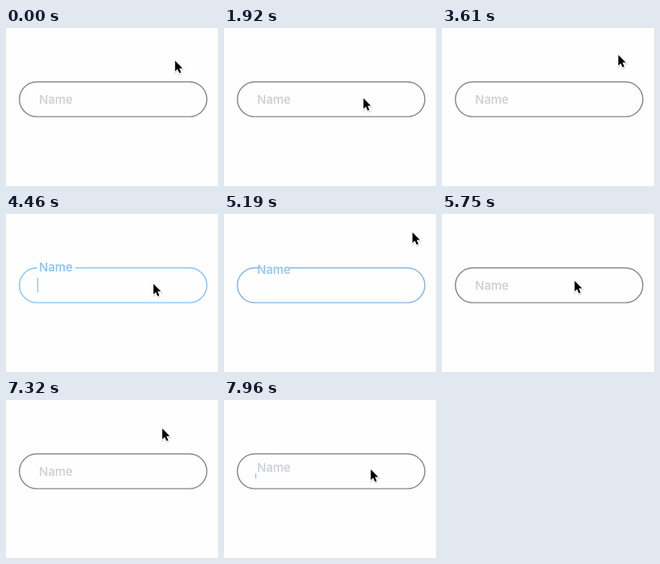
These frames come from a looping animation (266x198 px, 7.99 s). An HTML page:

```html
<!DOCTYPE html>
<html lang="en">
<head>
<meta charset="utf-8">
<title>Floating label field</title>
<style>
  html, body { margin: 0; width: 100%; height: 100%; overflow: hidden; background: #fefefe; }
  svg { display: block; width: 100vw; height: 100vh; }
  text { font: 500 15px Inter, "Open Sans", sans-serif; }
</style>
</head>
<body>
<svg viewBox="0 0 266 198">
  <defs>
    <path id="arrow" d="M0 0V13.4L3 10.5L5.3 15.6L7.4 14.7L5.2 9.6H9.3Z"/>
  </defs>
  <rect id="border" x="16.8" y="67.5" width="235.2" height="43.6" rx="21.8" fill="#fefefe" stroke-width="1.4"/>
  <rect id="gap" y="66" height="4" fill="#fefefe"/>
  <text id="label" x="41.6">Name</text>
  <rect id="caret" x="39.2" width="1.2" fill="#7cbcf4"/>
  <g id="pointer">
    <use href="#arrow" x=".8" y="2" stroke="#000" stroke-width="2.4" opacity=".14"/>
    <use href="#arrow" x=".5" y=".9" stroke="#fff" stroke-width="2" paint-order="stroke"/>
  </g>
</svg>
<script>
const LOOP = 7990;
const GREY = [134, 131, 133], PLACEHOLDER = [204, 204, 207], BLUE = [126, 194, 252];
const START = [211.7, 40];

// Each visit: the pointer arrives at the field, clicks, leaves, clicks outside and rests.
const visits = [
  { arrive: 800, focus: 2010, leave: 2410, blur: 2900, field: [174.5, 87], away: [207.5, 26], rest: [226, 25] },
  { arrive: 3500, focus: 4140, leave: 4460, blur: 5130, field: [184.5, 86.5], away: [236, 22], rest: [236, 22] },
  { arrive: 5300, focus: 6090, leave: 6230, blur: 6900, field: [164, 84.5], away: [197.7, 26], rest: [197.7, 26] },
  { arrive: 7200, focus: 7930, leave: LOOP, blur: LOOP, field: [183.7, 86], away: START, rest: START }
];

const mix = (a, b, u) => a + (b - a) * u;
const mixAll = (a, b, u) => a.map((v, i) => mix(v, b[i], u));
const rgb = color => `rgb(${color.map(Math.round)})`;

function ramp(time, begin, duration) {
  const u = Math.min(1, Math.max(0, (time - begin) / duration));
  return u * u * (3 - 2 * u);
}

function stateAt(time) {
  let point = START, focus = 0, caret = 0;
  for (const v of visits) {
    point = mixAll(point, v.field, ramp(time, v.arrive, 500));
    point = mixAll(point, v.away, ramp(time, v.leave, 380));
    point = mixAll(point, v.rest, ramp(time, v.leave + 400, 150));
    focus = mix(focus, 1, ramp(time, v.focus, 110));
    focus = mix(focus, 0, ramp(time, v.blur, 290));
    if (time >= v.focus) caret = 1 - ramp(time, v.focus + 540, 120);
  }
  return { point, focus, caret };
}

const [border, gap, label, caretBar, pointer] =
  ["border", "gap", "label", "caret", "pointer"].map(id => document.getElementById(id));

function set(element, attributes) {
  for (const name in attributes) element.setAttribute(name, attributes[name]);
}

function draw(time) {
  const { point, focus, caret } = stateAt(time);
  const tint = focus * focus;
  const gapWidth = 48 * tint;
  const caretHeight = 18.5 * Math.min(1, focus * 1.7);

  set(border, { stroke: rgb(mixAll(GREY, BLUE, tint)) });
  set(gap, { x: 63 - gapWidth / 2, width: gapWidth, opacity: tint });
  set(label, { fill: rgb(mixAll(PLACEHOLDER, BLUE, tint)), y: mix(94.7, 72, focus) });
  set(caretBar, { y: 98.5 - caretHeight, height: caretHeight, opacity: caret });
  set(pointer, { transform: `translate(${point})` });
}

const start = performance.now();
function tick() {
  draw((performance.now() - start) % LOOP);
  requestAnimationFrame(tick);
}
tick();
</script>
</body>
</html>
```
